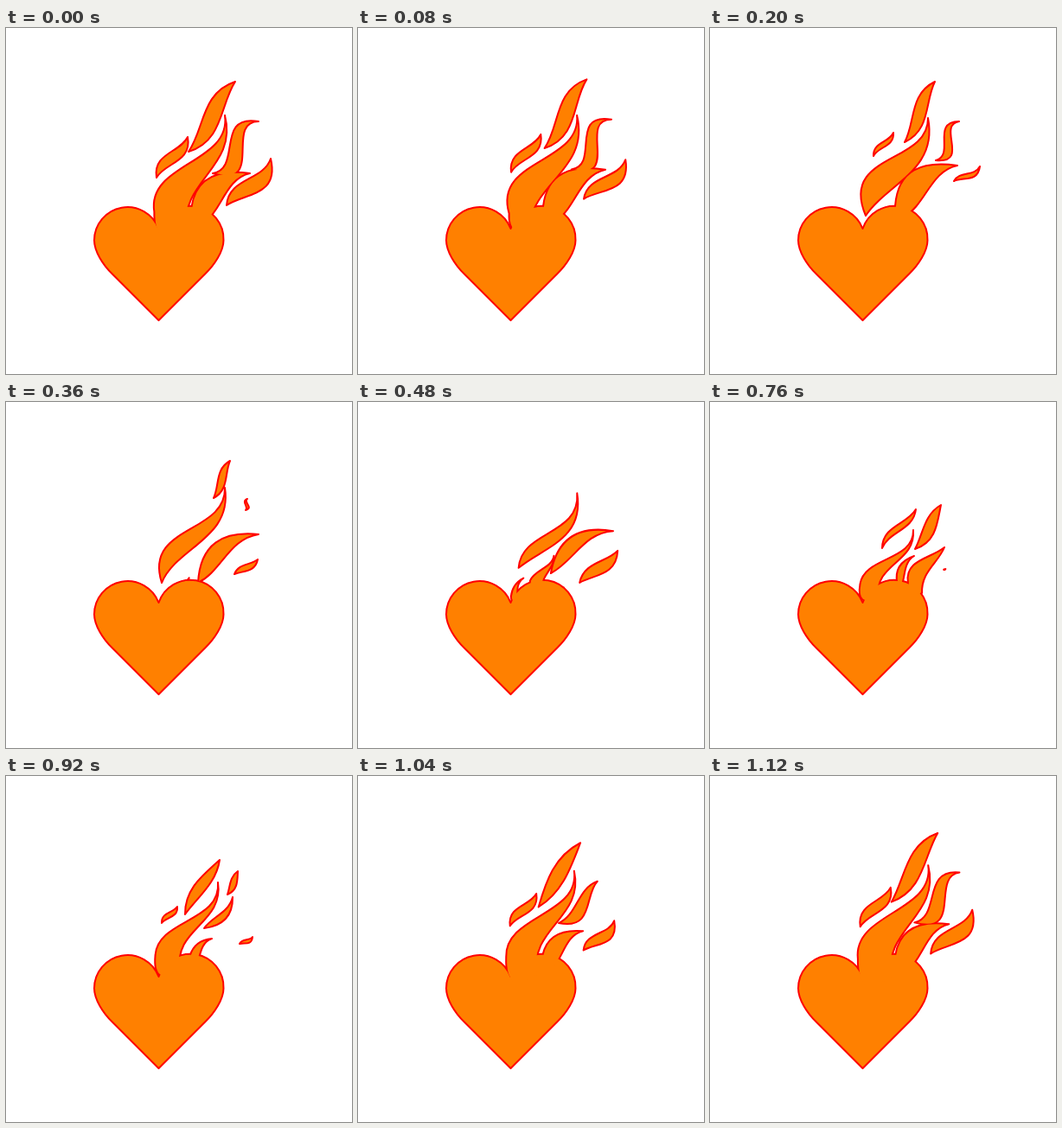
These frames come from a looping animation (400 by 400 pixels, 1160 ms). An HTML page with a canvas:

```html
<!DOCTYPE html>
<html lang="en">
<head>
<meta charset="utf-8">
<title>Burning heart</title>
<style>
  html, body { margin: 0; width: 100%; height: 100%; overflow: hidden; background: #fff; }
  canvas { display: block; width: 400px; height: 400px; }
</style>
</head>
<body>
<canvas id="stage" width="400" height="400"></canvas>
<script>
const LOOP = 1160, STEP = 40, SIZE = 400;
const ORANGE = '#ff8000', RED = '#ff0000';

const ctx = document.getElementById('stage').getContext('2d');
const scratch = document.createElement('canvas');
scratch.width = scratch.height = SIZE;
const pad = scratch.getContext('2d');

const heart = new Path2D(
  'M176.5 232 A38.5 38.5 0 0 0 102 245.5 C102 258 112 274 123 284.5 ' +
  'L176.5 338 L230 284.5 C241 274 251.5 258 251.5 245.5 A38.5 38.5 0 0 0 176.5 232 Z');

// A pose is a leaf from tail to tip. Swell is its fatness, base the half width
// of its foot, bend the sideways pull of the spine as shares of its length.
const pose = (time, tip, tail, swell, { base = 0, bend } = {}) =>
  ({ time, tip, tail, swell, base, bend });

// Every flame grows out of its first tail and shrinks away past its last tip.
const flames = [];
function flame({ bend, taper = 1, grow, fade }, ...poses) {
  const first = poses[0], last = poses[poses.length - 1];
  const [x, y] = last.tip, gone = [x + 3, y - 5];
  const life = [
    pose(first.time - grow, first.tail, first.tail, 0, { bend: first.bend }),
    ...poses,
    pose(last.time + fade, gone, gone, 0, { bend: last.bend })
  ];
  const keys = life.map(p => ({
    time: p.time,
    v: [...p.tip, ...p.tail, p.swell, p.base, ...(p.bend || bend)]
  }));
  flames.push({ keys, taper });
}

// left tongue
flame({ bend: [-0.24, 0.27], taper: 0.2, grow: 260, fade: 90 },
  pose(600, [203, 183], [181, 226], 6, { base: 8, bend: [-0.15, -0.2] }),
  pose(760, [235, 148], [184, 218], 7, { base: 13 }),
  pose(920, [245, 123], [187, 216], 10, { base: 17 }),
  pose(1160, [253, 101], [190, 222], 22, { base: 21 }),
  pose(1360, [252, 104], [180, 217], 33),
  pose(1520, [253, 99], [180, 209], 23),
  pose(1760, [254, 112], [202, 164], 9, { bend: [0.1, 0.4] }));

// right tongue
flame({ bend: [-0.15, -0.26], taper: 0.3, grow: 280, fade: 80 },
  pose(600, [238, 160], [207, 211], 8, { base: 12, bend: [-0.15, 0.15] }),
  pose(760, [236, 178], [219, 211], 7, { base: 3 }),
  pose(920, [238, 188], [217, 212], 6, { base: 6 }),
  pose(1160, [282, 168], [222, 216], 24, { base: 12 }),
  pose(1360, [286, 159], [219, 212], 26, { base: 8 }),
  pose(1520, [292, 153], [222, 209], 20),
  pose(1760, [298, 145], [236, 179], 12));

// tongue that tears off to the right
flame({ bend: [0.5, -0.46], taper: 0.4, grow: 130, fade: 50 },
  pose(600, [280, 162], [234, 219], 17, { base: 15, bend: [-0.36, 0.19] }),
  pose(760, [271, 168], [237, 215], 12, { base: 10, bend: [-0.3, 0] }),
  pose(920, [262, 140], [229, 176], 8, { bend: [0.12, 0.25] }),
  pose(1160, [292, 108], [239, 168], 18),
  pose(1360, [288, 108], [261, 153], 10),
  pose(1520, [279, 112], [277, 125], 3));

// top lick
flame({ bend: [0.14, -0.13], grow: 168, fade: 100 },
  pose(760, [238, 124], [199, 169], 5, { bend: [-0.2, 0.15] }),
  pose(920, [247, 97], [207, 160], 9, { bend: [-0.1, 0.03] }),
  pose(1160, [265, 62], [211, 143], 13),
  pose(1360, [260, 62], [225, 132], 10),
  pose(1520, [259, 68], [240, 111], 6));

// small left lick
flame({ bend: [-0.2, 0.22], grow: 50, fade: 80 },
  pose(920, [198, 151], [180, 170], 4),
  pose(1160, [210, 126], [174, 173], 9),
  pose(1360, [212, 121], [189, 148], 4));

// brief lick in the middle
flame({ bend: [0.14, -0.04], grow: 130, fade: 70 },
  pose(760, [267, 119], [237, 170], 9),
  pose(920, [268, 110], [256, 137], 5));

// far right licks
flame({ bend: [-0.1, 0.33], grow: 190, fade: 70 },
  pose(920, [285, 186], [270, 194], 3),
  pose(1160, [306, 151], [255, 205], 13),
  pose(1360, [312, 160], [282, 177], 4));
flame({ bend: [-0.1, 0.2], grow: 60, fade: 120 },
  pose(360, [291, 182], [264, 199], 5),
  pose(600, [304, 165], [257, 210], 11));

// Smooth interpolation through the keys.
function valuesAt(keys, t) {
  const i = keys.findIndex(k => k.time > t) - 1;
  const a = keys[i], b = keys[i + 1];
  const before = keys[i - 1] || a, after = keys[i + 2] || b;
  const span = b.time - a.time, u = (t - a.time) / span;
  const ease = u * u * (3 - 2 * u);
  const wa = u * (1 - u) * (1 - u), wb = u * u * (u - 1);
  return a.v.map((p, j) => {
    const q = b.v[j];
    const va = (q - before.v[j]) / (b.time - before.time) * span;
    const vb = (after.v[j] - p) / (after.time - a.time) * span;
    return p + (q - p) * ease + va * wa + vb * wb;
  });
}

function leaf([tipX, tipY, x, y, swell, base, near, far], taper) {
  const len = Math.hypot(tipX - x, tipY - y) || 1;
  const dx = (tipX - x) / len, dy = (tipY - y) / len;
  const at = (along, side) => [x + dx * along - dy * side, y + dy * along + dx * side];
  const fat = Math.max(0, swell), foot = Math.max(0, base);
  const low = side => at(len / 3, near * len + side * fat);
  const high = side => at(len * 2 / 3, far * len + side * fat * taper);

  const path = new Path2D();
  path.moveTo(...at(0, -foot));
  path.bezierCurveTo(...low(-1), ...high(-1), tipX, tipY);
  path.bezierCurveTo(...high(1), ...low(1), ...at(0, foot));
  path.quadraticCurveTo(...at(-2 * foot, 0), ...at(0, -foot));
  path.closePath();
  return path;
}

// Red silhouettes first, then the inset orange, so overlaps merge.
function paint(shapes) {
  ctx.fillStyle = '#fff';
  ctx.fillRect(0, 0, SIZE, SIZE);
  ctx.fillStyle = ctx.strokeStyle = RED;
  for (const s of shapes) {
    ctx.fill(s);
    ctx.stroke(s);
  }
  pad.fillStyle = ORANGE;
  for (const s of shapes) {
    pad.globalCompositeOperation = 'source-over';
    pad.clearRect(0, 0, SIZE, SIZE);
    pad.fill(s);
    pad.globalCompositeOperation = 'destination-out';
    pad.stroke(s);
    ctx.drawImage(scratch, 0, 0);
  }
}

function draw(t) {
  const shapes = [heart];
  for (const { keys, taper } of flames) {
    for (const time of [t, t + LOOP]) {
      if (time > keys[0].time && time < keys[keys.length - 1].time) {
        shapes.push(leaf(valuesAt(keys, time), taper));
      }
    }
  }
  paint(shapes);
}

for (const c of [ctx, pad]) {
  c.lineWidth = 2;
  c.lineJoin = 'round';
}

const start = performance.now();
let shown = -1;
function tick() {
  const t = Math.floor(((performance.now() - start) % LOOP) / STEP) * STEP;
  if (t !== shown) draw(shown = t);
  requestAnimationFrame(tick);
}
tick();
</script>
</body>
</html>
```
